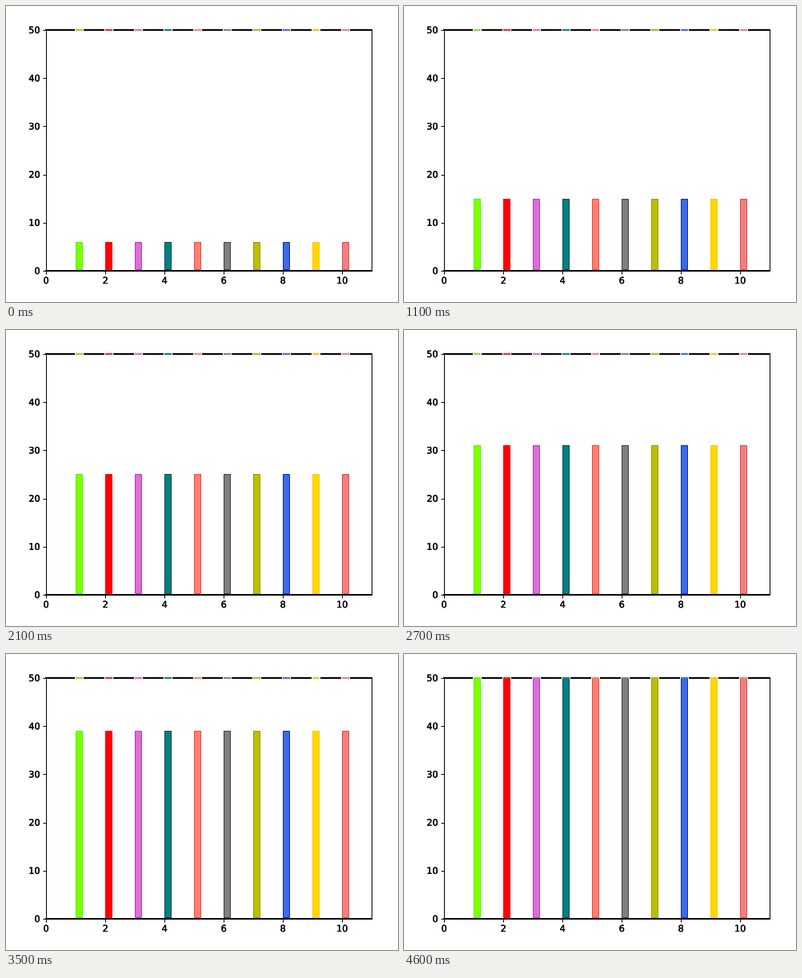
A matplotlib script for the animation above (4.7 s loop, 490 by 370 pixels).

```python
import matplotlib.pyplot as plt
from matplotlib import patheffects
from matplotlib.animation import FuncAnimation

W, H, DPI = 490, 370, 80
PX = 72 / DPI  # one pixel in points
FRAMES, INTERVAL = 47, 100
BASE = 0.4  # thin gap between bars and the axis

FILLS = ["#80ff00", "#ff0000", "#da70d6", "#008080", "#ff8072",
         "#808080", "#bfbf00", "#4169e1", "#ffd700", "#f08080"]
EDGES = ["#40ff00", "#ff0000", "#c832c3", "#004848", "#f84838",
         "#404040", "#989800", "#0030d0", "#ffc400", "#e84848"]
CAPS = ["#80e030", "#f02828", "#d070cc", "#108080", "#f08078",
        "#808080", "#b4b420", "#4468d8", "#f0cc20", "#e88080"]

plt.rcParams.update({
    "font.family": "DejaVu Sans",
    "font.size": 10.2,
    "axes.linewidth": PX,
    "xtick.major.width": PX,
    "ytick.major.width": PX,
    "xtick.major.size": 4 * PX,
    "ytick.major.size": 4 * PX,
    "xtick.major.pad": 4 * PX,
    "ytick.major.pad": 3.5 * PX,
})

fig = plt.figure(figsize=(W / DPI, H / DPI), dpi=DPI, facecolor="white")
ax = fig.add_axes([50.2 / W, 39 / H, 407 / W, 301 / H])
ax.set(xlim=(0, 11), ylim=(0, 50),
       xticks=range(0, 11, 2), yticks=range(0, 51, 10))
for side in ("top", "bottom"):
    ax.spines[side].set_linewidth(2 * PX)
for label in ax.get_xticklabels() + ax.get_yticklabels():
    label.set_path_effects(
        [patheffects.withStroke(linewidth=0.3 * PX, foreground="black")])

xs = range(1, 11)
bars = ax.bar(xs, [6 - BASE] * 10, width=0.2, bottom=BASE, align="edge",
              color=FILLS, edgecolor=EDGES, linewidth=PX)


def top_mark(x0, x1, color):
    ax.plot([x0, x1], [50, 50], color=color, lw=2 * PX,
            solid_capstyle="butt", clip_on=False, zorder=5)


# Coloured traces of each bar on the top border
for x, color in zip(xs, CAPS):
    top_mark(x - 0.04, x + 0.26, "white")
    top_mark(x - 0.01, x + 0.23, color)


def height(i):
    """Grow one unit per step, pausing at steps 2 and 6."""
    return 6 + i - (i >= 2) - (i >= 6)


def update(i):
    for bar in bars:
        bar.set_height(height(i) - BASE)
    return list(bars)


anim = FuncAnimation(fig, update, frames=FRAMES, interval=INTERVAL,
                     repeat=True, repeat_delay=0, blit=False)
plt.show()
```
